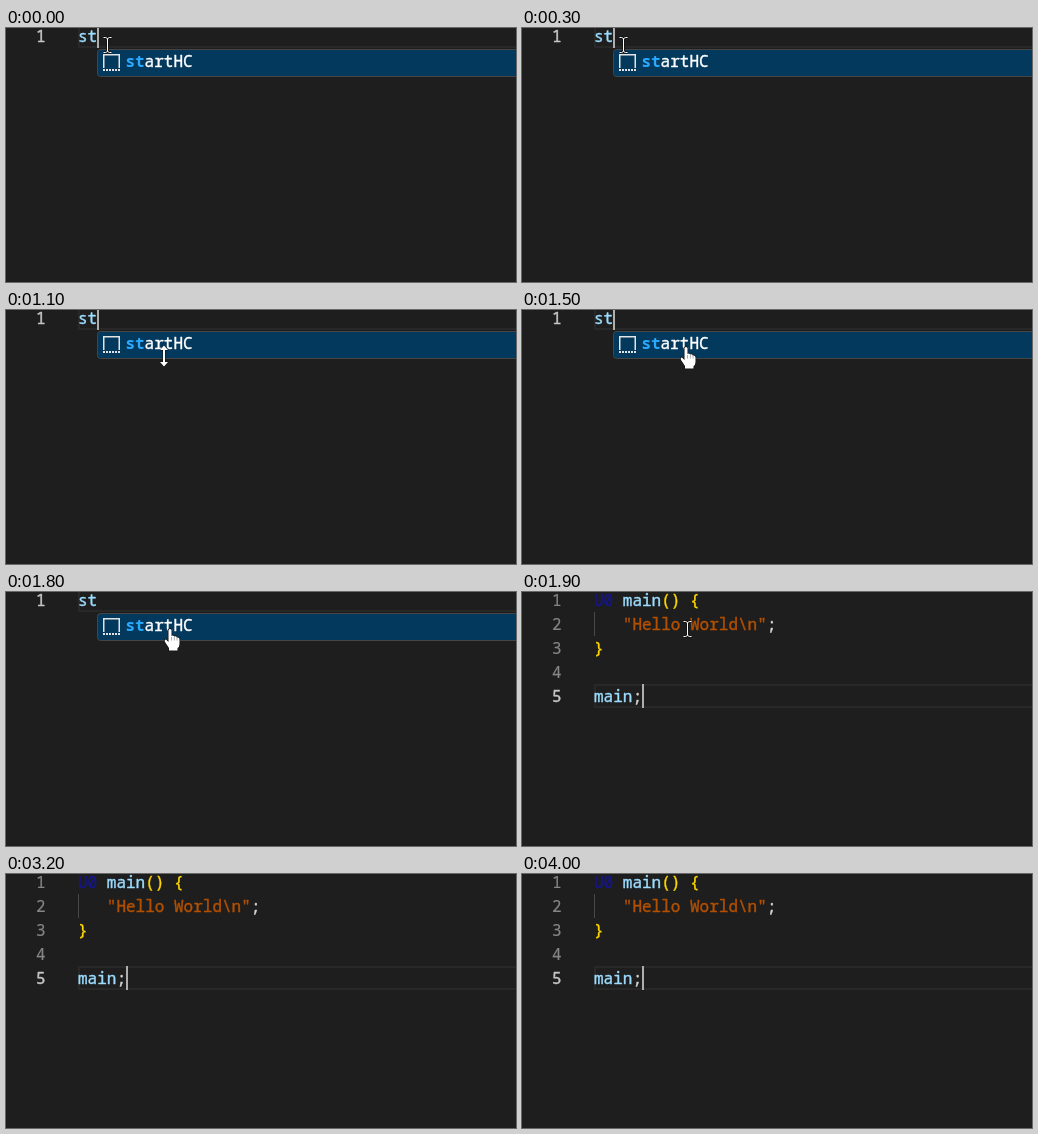
Write an HTML page with a canvas that moves like this. It is 510x254 px and loops after 4100 ms.

```html
<!DOCTYPE html>
<html lang="en">
<head>
<meta charset="utf-8">
<title>Snippet completion</title>
<style>
html, body { margin: 0; width: 100%; height: 100%; overflow: hidden; background: #1e1e1e; }
canvas { display: block; }
</style>
</head>
<body>
<canvas id="stage" width="510" height="254"></canvas>
<script>
const ctx = document.getElementById('stage').getContext('2d');
const LOOP = 4100, STEP = 100, INSERT = 1900;
const CHAR = 9.6, LINE = 24, LEFT = 72, BASE = 14;
const FONT = '16px "Noto Sans Mono", monospace';
const C = {
  bg: '#1e1e1e', dim: '#858585', active: '#c6c6c6', ident: '#9cdcfe',
  type: '#16168f', brace: '#ffd700', string: '#b25000', plain: '#d4d4d4'
};

// Each run: line, column, text, colour
const code = [
  [0, 0, 'U0', C.type], [0, 3, 'main', C.ident], [0, 7, '() {', C.brace],
  [1, 3, '"Hello World\\n"', C.string], [1, 18, ';', C.plain],
  [2, 0, '}', C.brace],
  [4, 0, 'main', C.ident], [4, 4, ';', C.plain]
];

// Pointer keys: time, shape, x, y
const pointer = [
  [0, 'beam', 101, 17], [900, 'hand', 132, 28], [1000, 'beam', 158, 60],
  [1100, 'resize', 158, 46], [1200, 'resize', 158, 56],
  [1300, 'hand', 164, 37], [1900, 'beam', 165, 37], [2100, 'none', 0, 0]
];

function rect(x, y, w, h, color) {
  ctx.fillStyle = color;
  ctx.fillRect(x, y, w, h);
}

// A hairline stroke gives the strokes their slightly heavy weight
function text(s, x, y, color, weight = 'normal', heavy = 0.4) {
  ctx.font = weight + ' ' + FONT;
  ctx.fillStyle = ctx.strokeStyle = color;
  ctx.lineWidth = heavy;
  ctx.lineJoin = 'round';
  ctx.fillText(s, x, y);
  if (heavy) ctx.strokeText(s, x, y);
}

function lineBox(line) {
  ctx.strokeStyle = '#282828';
  ctx.lineWidth = 2;
  ctx.strokeRect(LEFT + 1, line * LINE - 3, 450, LINE - 2);
}

function lineNumber(line, active) {
  text(String(line + 1), 30, BASE + line * LINE, active ? C.active : C.dim, 'normal', active ? 0.4 : 0.2);
}

function caret(line, column) {
  rect(Math.round(LEFT + column * CHAR), line * LINE - 4, 2, LINE, '#aeafad');
}

function popup() {
  ctx.beginPath();
  ctx.roundRect(91.5, 21.5, 430, 27, 3);
  ctx.fillStyle = '#04395e';
  ctx.fill();
  ctx.strokeStyle = '#454545';
  ctx.lineWidth = 1;
  ctx.stroke();

  const ink = '#e4e4e4';
  rect(97, 26, 17, 1.5, ink);
  rect(97, 26, 1.5, 14, ink);
  rect(112.5, 26, 1.5, 14, ink);
  for (let x = 97; x < 114; x += 3) rect(x, 41, 2, 2, ink);

  text('st', 119.4, 39, '#2aaaff', 'bold', 0);
  text('artHC', 119.4 + 2 * CHAR, 39, '#ffffff');
}

function outlined(path, width) {
  ctx.lineJoin = 'miter';
  ctx.strokeStyle = '#111111';
  ctx.lineWidth = width + 1.6;
  ctx.stroke(path);
  ctx.strokeStyle = '#ffffff';
  ctx.lineWidth = width;
  ctx.stroke(path);
}

function solid(path, edge) {
  ctx.lineJoin = 'miter';
  ctx.strokeStyle = '#111111';
  ctx.lineWidth = edge;
  ctx.stroke(path);
  ctx.fillStyle = '#ffffff';
  ctx.fill(path);
}

const shapes = {
  none() {},
  beam() {
    outlined(new Path2D('M-3.5-7.5H-1.5L.5-6.5L2.5-7.5H4.5M.5-6.5V6.5M-3.5 7.5H-1.5L.5 6.5L2.5 7.5H4.5'), 1);
  },
  resize() {
    solid(new Path2D('M0-10.5L4-6H1V6H4L0 10.5L-4 6H-1V-6H-4Z'), 1);
  },
  hand() {
    solid(new Path2D('M-1.5 1Q0-1 1.5 1V7Q3 6 4.2 7.6Q6 6.8 7 8.5Q9.4 8 9.5 10.5V15Q9.5 18 7.5 19V21.5H-1V19L-5 13Q-6 10.5-4 10.5L-1.5 13Z'), 1.4);
    for (const x of [1.5, 4.2, 7]) rect(x - .3, 8, .6, 3.5, '#777777');
  }
};

function drawPointer(t) {
  const [, shape, x, y] = pointer.filter(k => k[0] <= t).pop();
  ctx.save();
  ctx.translate(x, y);
  shapes[shape]();
  ctx.restore();
}

function caretOn(t) {
  if (t < INSERT) return t < 600 || (t >= 1100 && t < 1600);
  return Math.floor((t - INSERT) / 500) % 2 === 0;
}

function draw(t) {
  rect(0, 0, 510, 254, C.bg);
  if (t < INSERT) {
    lineBox(0);
    lineNumber(0, true);
    text('st', LEFT, BASE, C.ident);
    if (caretOn(t)) caret(0, 2);
    popup();
  } else {
    lineBox(4);
    for (let i = 0; i < 5; i++) lineNumber(i, i === 4);
    rect(LEFT, LINE - 4, 1, LINE, '#484848');
    for (const [line, col, s, color] of code) {
      text(s, LEFT + col * CHAR, BASE + line * LINE, color);
    }
    if (caretOn(t)) caret(4, 5);
  }
  drawPointer(t);
}

const start = performance.now();
function tick() {
  const t = (performance.now() - start) % LOOP;
  draw(Math.floor(t / STEP) * STEP);
  requestAnimationFrame(tick);
}
tick();
</script>
</body>
</html>
```
